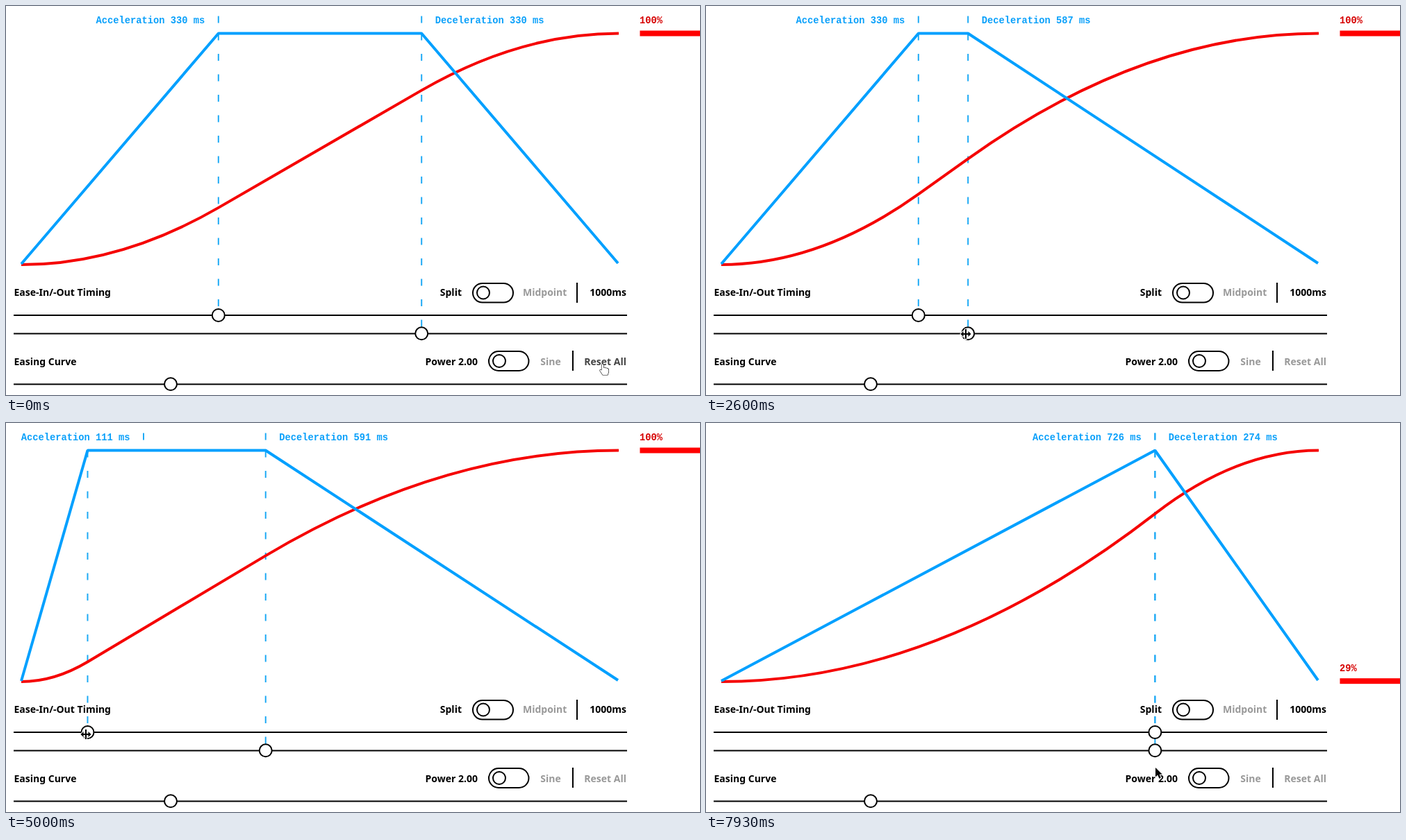
Recreate the animation shown at these times as an HTML page. Size 999 px wide and 561 px high, loop 8000 ms.

```html
<!DOCTYPE html>
<html lang="en">
<head>
<meta charset="utf-8">
<title>Easing editor</title>
<style>
  html, body { margin: 0; width: 100%; height: 100%; overflow: hidden; background: #fff; }
  svg { display: block; width: 999px; height: 561px; }
  text { font: 700 14px "Noto Sans", sans-serif; }
  .mono { font: 700 13.75px "Liberation Mono", monospace; }
  .blue { fill: #0aa0fa; }
  .muted { fill: #999; }
  .end { text-anchor: end; }
  .mid { text-anchor: middle; }
  .ink { fill: none; stroke: #000; stroke-width: 2; }
  .knob { fill: #fff; stroke: #000; stroke-width: 2; }
  .dash { fill: none; stroke: #1eaaf5; stroke-width: 2; }
  .dash.long { stroke-dasharray: 10 19.5; }
  .curve { fill: none; stroke-width: 4; stroke-linejoin: bevel; }
  .cursor path { stroke-linejoin: round; paint-order: stroke; }
</style>
</head>
<body>
<svg viewBox="0 0 999 561">
  <path id="accelDash" class="dash long"/>
  <path id="decelDash" class="dash long"/>
  <path id="accelTick" class="dash"/>
  <path id="decelTick" class="dash"/>
  <path id="position" class="curve" stroke="#f50000"/>
  <path id="speed" class="curve" stroke="#00a0ff"/>
  <text id="accelLabel" class="mono blue end" y="25"></text>
  <text id="decelLabel" class="mono blue" y="25"></text>

  <g id="bar">
    <text id="percent" class="mono" x="912" y="-14.5" fill="#d60000"></text>
    <rect x="912.5" y="-4" width="87" height="8" fill="#f00"/>
  </g>

  <text x="11.5" y="418">Ease-In/-Out Timing</text>
  <text class="end" x="656" y="418">Split</text>
  <rect class="ink" x="672" y="400" width="58" height="27.5" rx="13.75"/>
  <circle class="ink" cx="687" cy="413.5" r="9"/>
  <text class="muted mid" x="775.7" y="418">Midpoint</text>
  <path class="ink" d="M822 399V428"/>
  <text class="end" x="893" y="418">1000ms</text>

  <text x="11.5" y="517.5">Easing Curve</text>
  <text class="end" x="679" y="517.5">Power 2.00</text>
  <rect class="ink" x="695" y="498" width="57.5" height="28" rx="14"/>
  <circle class="ink" cx="710" cy="512" r="9"/>
  <text class="muted mid" x="784" y="517.5">Sine</text>
  <path class="ink" d="M816 497V526"/>
  <text id="reset" class="end" x="893" y="517.5">Reset All</text>

  <path class="ink" d="M11 446H894M11 472.5H894M11 545.5H894"/>
  <circle id="accelKnob" class="knob" cy="446" r="9"/>
  <circle id="decelKnob" class="knob" cy="472.3" r="9"/>
  <circle class="knob" cx="237" cy="545.3" r="9"/>

  <g id="cursor" class="cursor">
    <path id="arrow" stroke="#fff" stroke-width="2" d="M0 0V13.5L3.2 10.6L5.4 15.8L7.8 14.8L5.6 9.8H9.8Z"/>
    <path id="resize" stroke="#fff" stroke-width="2" d="M-7.5 0L-3.5 -4V-1H-1V-7H1V-1H3.5V-4L7.5 0L3.5 4V1H1V7H-1V1H-3.5V4Z"/>
    <path id="hand" fill="#fff" stroke="#000" stroke-width="1.2" d="M-3.5 1.5V-6.5Q-2.2 -9 -1 -6.5V-2Q.5 -3.5 1.7 -1.6Q3.2 -2.6 4.2 -1Q6.4 -1.4 6.4 .8V3.5L5 8H-2L-6 2Q-6 -.5 -3.5 1.5ZM-.8 2V5.5M1.7 2V5.5M4 2V5.5"/>
  </g>
</svg>
<script>
const LOOP = 8000, FPS = 15;
const LEFT = 22, WIDTH = 860, TOP = 39.5, BOTTOM = 373;
const $ = Object.fromEntries([...document.querySelectorAll('[id]')].map(e => [e.id, e]));

const ease = {
  in: k => k * k,
  out: k => k * (2 - k),
  both: k => k * k * (3 - 2 * k),
  line: k => k
};

// Rows: time, easing into this row, values
const accelKeys = [[3950, 'line', 330], [4200, 'in', 259], [4720, 'out', 111],
  [6130, 'line', 111], [6933, 'line', 586], [7400, 'out', 726]];
const decelKeys = [[1930, 'line', 670], [2000, 'line', 671], [2600, 'both', 413], [2720, 'out', 409]];
const cursorKeys = [[900, 'line', 861, 524], [1730, 'both', 599, 471], [2000, 'line', 599, 471],
  [2600, 'both', 374, 473], [2720, 'out', 373, 473], [3480, 'line', 373, 473],
  [3850, 'both', 306, 447], [3920, 'line', 306, 447], [4200, 'in', 221, 447],
  [4660, 'out', 115, 449], [6100, 'line', 115, 449], [6933, 'line', 558, 489], [7350, 'out', 647, 497]];

function sample(keys, time) {
  const i = keys.findIndex(key => key[0] > time);
  if (i === 0) return keys[0].slice(2);
  if (i < 0) return keys[keys.length - 1].slice(2);
  const [from, to] = [keys[i - 1], keys[i]];
  const k = ease[to[1]]((time - from[0]) / (to[0] - from[0]));
  return to.slice(2).map((v, n) => from[n + 2] + (v - from[n + 2]) * k);
}

function eased(t, a, d) {
  const top = 1 / (1 - (a + d) / 2);
  if (t < a) return top * t * t / (2 * a);
  if (t > 1 - d) return 1 - top * (1 - t) ** 2 / (2 * d);
  return top * (t - a / 2);
}

const px = t => LEFT + t * WIDTH;
const py = p => BOTTOM - p * (BOTTOM - TOP);
const set = (el, attrs) => Object.entries(attrs).forEach(([k, v]) => el.setAttribute(k, v));

function drawGraph(accel, decelAt) {
  const a = accel / 1000, end = decelAt / 1000, d = 1 - end;
  const xa = px(a), xd = px(end), tick = Math.max(xa, 198);
  set($.position, { d: `M${LEFT} ${BOTTOM}Q${px(a / 2)} ${BOTTOM} ${xa} ${py(eased(a, a, d))}` +
    `L${xd} ${py(eased(end, a, d))}Q${px(1 - d / 2)} ${TOP} ${px(1)} ${TOP}` });
  set($.speed, { d: `M${LEFT} 372L${xa} ${TOP}H${xd}L881 371` });
  set($.accelDash, { d: `M${xa} ${TOP}V437` });
  set($.decelDash, { d: `M${xd} ${TOP}V464` });
  set($.accelTick, { d: `M${tick} 14.5V24.5` });
  set($.decelTick, { d: `M${xd} 14.5V24.5` });
  set($.accelLabel, { x: tick - 19.5 });
  set($.decelLabel, { x: xd + 19.5 });
  $.accelLabel.textContent = `Acceleration ${Math.round(accel)} ms`;
  $.decelLabel.textContent = `Deceleration ${Math.round(1000 - decelAt)} ms`;
  set($.accelKnob, { cx: xa });
  set($.decelKnob, { cx: xd });
}

function drawBar(time, accel, decelAt) {
  const cycle = (time - 125 + 2505) % 2505;
  const run = Math.min(1, cycle / 1000);
  const travel = Math.max(0, (run - 0.262) / 0.738);
  const p = eased(travel, accel / 1000, 1 - decelAt / 1000);
  set($.bar, { transform: `translate(0 ${py(p)})` });
  $.percent.textContent = `${Math.round(run * 100)}%`;
}

function drawCursor(time) {
  const [x, y] = sample(cursorKeys, time);
  const kind = x > 832 && y > 505 ? 'hand' : y < 482 ? 'resize' : 'arrow';
  for (const name of ['arrow', 'resize', 'hand']) $[name].style.display = name === kind ? '' : 'none';
  set($.cursor, { transform: `translate(${x} ${y})` });
  set($.reset, { fill: kind === 'hand' ? '#444' : '#999' });
}

function render(now) {
  const time = Math.floor((now % LOOP + 5) * FPS / 1000) * 1000 / FPS % LOOP;
  const [accel] = sample(accelKeys, time);
  const decelAt = Math.max(accel, sample(decelKeys, time)[0]);
  drawGraph(accel, decelAt);
  drawBar(time, accel, decelAt);
  drawCursor(time);
}

const start = performance.now();
function tick() {
  render(performance.now() - start);
  requestAnimationFrame(tick);
}
tick();
</script>
</body>
</html>
```
